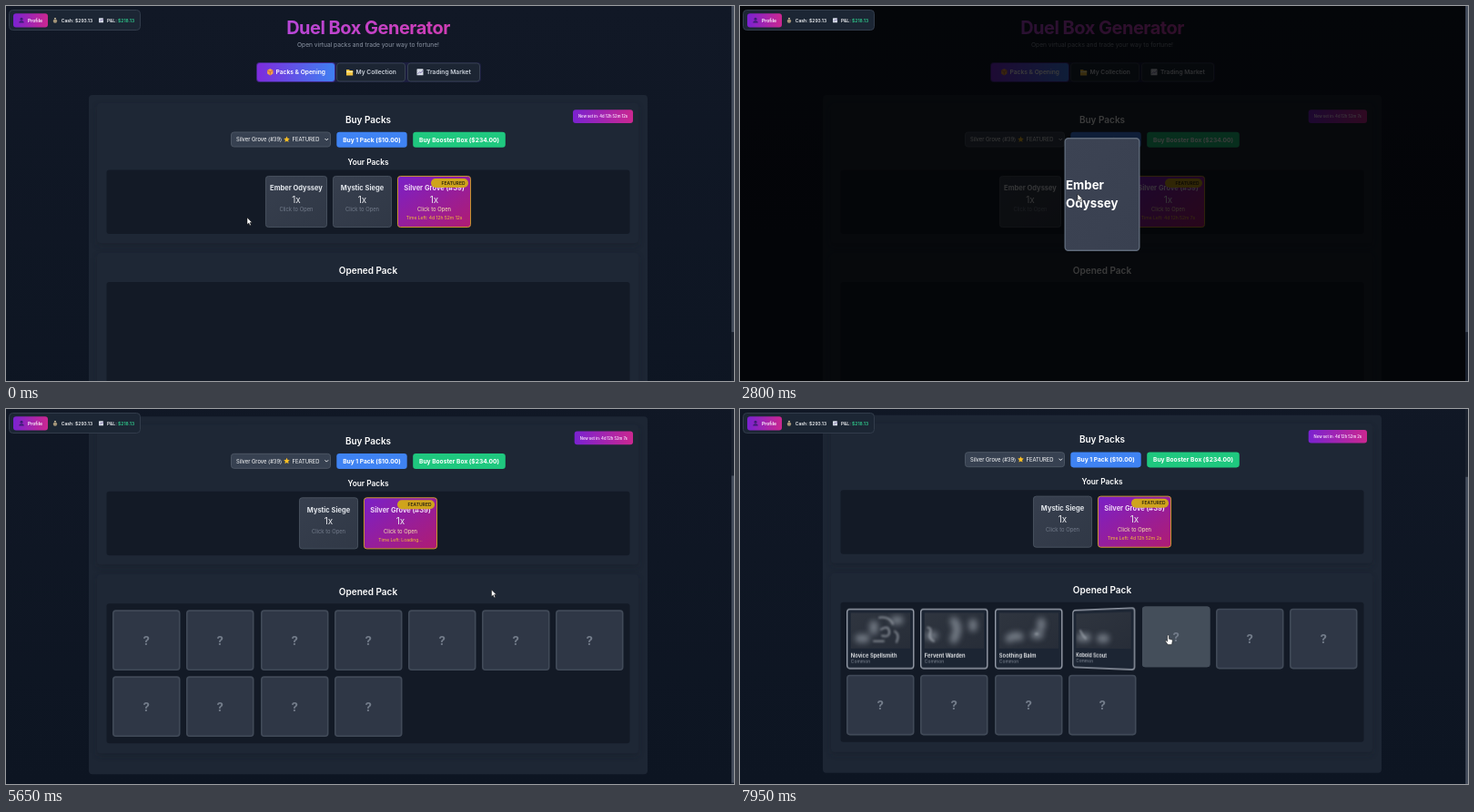
Animation, 800 px wide and 413 px high, one loop 8000 ms. Source, as an HTML page:

```html
<!DOCTYPE html>
<html lang="en">
<head>
<meta charset="utf-8">
<title>Pack opening</title>
<style>
html, body { margin: 0; width: 100%; height: 100%; overflow: hidden; background: #101724; }
#stage { position: relative; width: 800px; height: 413px; overflow: hidden; }
#page { position: absolute; left: 0; top: 0; width: 800px; height: 505px; }
svg { position: absolute; left: 0; top: 0; display: block; overflow: visible; }
text { font-family: Inter, sans-serif; white-space: pre; }
.card { position: absolute; width: 74.5px; height: 66.7px; }
</style>
</head>
<body>
<div id="stage">
  <div id="page"></div>
  <svg id="top" width="800" height="413"></svg>
</div>
<script>
const LOOP = 8000;
const $ = id => document.getElementById(id);

// ---- markup helpers ----
const rect = (x, y, w, h, fill, more = '') =>
  `<rect x="${x}" y="${y}" width="${w}" height="${h}" fill="${fill}" ${more}/>`;
const box = (x, y, w, h, fill, line, r = 3, lw = 1) =>
  rect(x + lw / 2, y + lw / 2, w - lw, h - lw, fill, `rx="${r}" stroke="${line}" stroke-width="${lw}"`);
const text = (s, x, y, size, fill = '#fff', weight = 400, anchor = 'middle', more = '') =>
  `<text x="${x}" y="${y}" font-size="${size}" fill="${fill}" font-weight="${weight}" text-anchor="${anchor}" ${more}>${s}</text>`;
const grad = (id, a, b, x2 = 1, y2 = 0) =>
  `<linearGradient id="${id}" x2="${x2}" y2="${y2}"><stop stop-color="${a}"/><stop offset="1" stop-color="${b}"/></linearGradient>`;
const path = (d, fill, more = '') => `<path d="${d}" fill="${fill}" ${more}/>`;

const chartIcon = (x, y, s) =>
  rect(x, y, s, s, '#d5dbe6', 'rx=".6"') +
  path(`M${x + 1} ${y + s - 1.5}l${s * .3} ${-s * .3} ${s * .2} ${s * .15} ${s * .3} ${-s * .4}`, 'none', 'stroke="#7c6ea8" stroke-width=".9"');
const star = (x, y, r) => {
  const pts = [...Array(10)].map((_, i) => {
    const a = i * Math.PI / 5 - Math.PI / 2, q = i % 2 ? r * .48 : r;
    return (x + q * Math.cos(a)).toFixed(2) + ',' + (y + q * Math.sin(a)).toFixed(2);
  });
  return `<polygon points="${pts.join(' ')}" fill="#fbbf24"/>`;
};

// ---- page ----
const defs = `<defs>
  ${grad('bg', '#111826', '#0d1522', 0, 1)}
  ${grad('title', '#b847d8', '#d03db4')}
  ${grad('tab', '#7e2bdc', '#3f80f2')}
  ${grad('pink', '#7a22d0', '#cb2790')}
  ${grad('foil', '#7a20c8', '#b01c72', 1, 1)}
  ${grad('slate', '#373f4e', '#303846', 1, 1)}
  ${grad('wrap', '#3c4353', '#394050', 1, 1)}
  ${grad('art', '#2f353f', '#272d38', 1, 1)}
  <filter id="soft" x="-10%" y="-20%" width="120%" height="140%"><feGaussianBlur stdDeviation="3"/></filter>
  <filter id="haze" x="-10" y="-10" width="95" height="70" filterUnits="userSpaceOnUse"><feGaussianBlur stdDeviation=".9"/></filter>
  <filter id="fog" x="-10" y="-10" width="95" height="70" filterUnits="userSpaceOnUse"><feGaussianBlur stdDeviation="3.2"/></filter>
</defs>`;

const header =
  text('Duel Box Generator', 398, 31, 20, 'url(#title)', 700, 'middle', 'letter-spacing="-.5"') +
  text('Open virtual packs and trade your way to fortune!', 398, 44.8, 6.67, '#8b94a3') +
  rect(275, 62, 247, 22, '#6d4df0', 'rx="4" opacity=".12"') +
  rect(275, 62, 87, 22, '#7c3aed', 'rx="4" opacity=".4"') +
  rect(276, 63, 85, 20, 'url(#tab)', 'rx="3"') +
  box(363, 62.5, 76, 21, '#1c2533', '#374151') +
  box(441, 62.5, 80, 21, '#1c2533', '#374151') +
  path('M290.3 69l3.2 1.8v3.8l-3.2 1.8-3.2-1.8v-3.8z', '#f59e4b') +
  path('M287.1 70.8l3.2 1.8 3.2-1.8M290.3 72.6v3.8', 'none', 'stroke="#a3542a" stroke-width=".6"') +
  path('M374 70h3l.8 1h3.4v5.5h-7.2z', '#f5c542') + rect(374, 72, 7.2, 1, '#fdf0c0') +
  chartIcon(451.5, 69.3, 7) +
  text('Packs &amp; Opening', 296.5, 75.4, 6.67, '#fff', 600, 'start') +
  text('My Collection', 384.5, 75.4, 6.67, '#cbd2dc', 600, 'start') +
  text('Trading Market', 462, 75.4, 6.67, '#cbd2dc', 600, 'start');

const section = (y, h, id) =>
  rect(100, y + 3, 595, h, '#131b28', `rx="4" filter="url(#soft)" opacity=".4" id="${id}Shade"`) +
  rect(100, y, 595, h, '#1e2735', `rx="4" id="${id}"`);

const shop =
  text('Buy Packs', 398, 128.7, 10, '#fff', 600) +
  `<rect id="badge" y="114.3" height="14.6" rx="3" fill="url(#pink)"/>` +
  text('', 656, 123.2, 4.17, '#f8e0fc', 600, 'middle', 'id="timer"') +
  box(247, 138.5, 110, 17, '#374151', '#4b5563') +
  text('Silver Grove (#39)', 253, 149.2, 5.83, '#fff', 400, 'start') + star(308.5, 147, 3.5) +
  text('FEATURED', 314.5, 149.2, 5.83, '#fff', 400, 'start') +
  path('M350.5 146l1.8 1.8 1.8-1.8', 'none', 'stroke="#fff" stroke-width=".9"') +
  rect(363.3, 138.7, 77.4, 17, '#3f83f3', 'rx="3.3"') + text('Buy 1 Pack ($10.00)', 402, 149.6, 6.67, '#fff', 700) +
  rect(447.2, 138.7, 101.6, 17, '#1fc87f', 'rx="3.3"') + text('Buy Booster Box ($234.00)', 498, 149.6, 6.67, '#fff', 700) +
  text('Your Packs', 398, 174.5, 8.33, '#fff', 600) +
  rect(110.5, 180.5, 575, 70.5, '#131a26', 'rx="3"');

function pack(name, x, w, hot) {
  const c = x + w / 2;
  return box(x, 187, w, 57, hot ? 'url(#foil)' : 'url(#slate)', hot ? '#d9a52a' : '#4b5563', 3, .9) +
    text(name, c, 203.4, 7.5, hot ? '#efd9f7' : '#e3e7ec', 700) +
    text('1x', c, 216.8, 10, '#e5e7eb') +
    text('Click to Open', c, 226.3, 5.83, hot ? '#f6e3ae' : '#727b8a') +
    (hot ? rect(x + 37, 190, 41, 10, '#cfa41c', 'rx="5"') +
      text('FEATURED', x + 61.5, 196.8, 5, '#2a2210', 600) +
      text('', c, 235.2, 5, '#f2c536', 400, 'middle', 'id="left"') : '');
}

$('page').innerHTML = `<svg width="800" height="505">${defs}
  ${rect(0, 0, 800, 505, 'url(#bg)')}${header}
  ${rect(91, 98, 614, 394, '#1d2634', 'rx="4" id="panel"')}
  ${section(107, 154, 'secA')}${section(272, 197, 'secB')}${shop}
  <g id="first">${pack('Ember Odyssey', 285, 68)}</g>
  <g id="rest">${pack('Mystic Siege', 359, 65)}${pack('Silver Grove (#39)', 430, 81, true)}</g>
  ${text('Opened Pack', 398, 294.5, 10, '#fff', 600)}
  ${rect(110.5, 304, 575, 154, '#131a26', 'rx="3" id="tray"')}
</svg>`;

// ---- cards ----
const W = 74.5, H = 66.7;
const finds = [
  { name: 'Novice Spellsmith', lines: 'M36 10q11-2 15 7M38 23q8-5 9 2t-8 5M30 36h11M53 25q6 4 2 12', mist: 'M14 33h7M53 13h5M30 18v6' },
  { name: 'Fervent Warden', lines: 'M8 21q5 0 3 6t4 9', mist: 'M37 14q7 7 0 20M58 16v5M10 30h5' },
  { name: 'Soothing Balm', lines: 'M45 28h2', mist: 'M51 15v5M44 29h5M16 33q6-4 11-2' },
  { name: 'Kobold Scout', lines: 'M10 24q3 6 7 9', mist: 'M10 32h9M35 33h6' }
];
const stroke = (d, width, filter, color, alpha) => path(d, 'none',
  `stroke="${color}" stroke-width="${width}" stroke-linecap="round" filter="url(#${filter})" opacity="${alpha}"`);
const face = f => box(0, 0, W, H, '#1c2533', '#959ca8', 3, 1.4) +
  `<svg x="4.5" y="4.5" width="65.5" height="39.5" viewBox="4.5 4.5 65.5 39.5" style="overflow:hidden">
    ${rect(4.5, 4.5, 65.5, 39.5, 'url(#art)')}
    ${stroke(f.mist, 9, 'fog', '#98a0aa', .65)}${stroke(f.lines, 2, 'haze', '#b4bac2', .65)}
  </svg>` +
  text(f.name, 4.8, 53.8, 5.83, '#f1f3f5', 600, 'start') + text('Common', 4.8, 60.2, 5, '#858d9a', 400, 'start');

const cards = [...Array(11)].map((_, i) => {
  const el = document.createElement('div');
  const x = 117.3 + 81.15 * (i % 7), y = i < 7 ? 311 : 384.4;
  el.className = 'card';
  el.style.cssText = `left:${x}px;top:${y}px`;
  el.innerHTML = `<svg width="${W}" height="${H}"><g class="back">${box(0, 0, W, H, '#2f3746', '#414a58', 3, 1.6)}
    ${rect(0, 0, W, H, '#444e5a', 'rx="3" class="glow"')}
    ${text('?', W / 2, 38.2, 13.3, '#737c8a', 700)}</g><g class="front">${finds[i] ? face(finds[i]) : ''}</g></svg>`;
  $('page').append(el);
  const q = c => el.querySelector(c);
  return { el, x, y, back: q('.back'), front: q('.front'), glow: q('.glow'), click: [6500, 6900, 7250, 7600][i] };
});

// ---- fixed layer ----
$('top').innerHTML = rect(0, 0, 800, 413, '#000', 'id="dim"') +
  `<g id="wrapper">${box(356.5, 145, 83, 125, 'url(#wrap)', '#5f6a7a', 3.5, 1.4)}
    <g id="sealed">${text('Ember', 358, 202, 13.33, '#fff', 700, 'start')}${text('Odyssey', 358, 222, 13.33, '#fff', 700, 'start')}</g>
    ${text('OPENED', 398, 212, 13.33, '#fff', 700, 'middle', 'id="opened"')}
    <g id="strip">${box(358, 145.5, 78, 11.5, '#3e4656', '#5f6a7a', 1.5)}</g></g>` +
  rect(797, 0, 3, 413, '#1a212e') + rect(797.3, 0, 2.7, 10, '#454e5d', 'id="thumb"') +
  box(3, 4, 145, 23, '#1c2634', '#323c4b', 4) +
  rect(8, 8.3, 38, 15.2, 'url(#pink)', 'rx="3"') +
  `<circle cx="17" cy="14.3" r="1.5" fill="#3b1d75"/>` + path('M14.3 18.6q0-2.4 2.7-2.4t2.7 2.4z', '#3b1d75') +
  text('Profile', 24, 17.7, 5.1, '#fff', 600, 'start') +
  `<circle cx="54" cy="16.6" r="2.2" fill="#a39478"/>` + path('M52.8 12.9h2.4l-.6 1.7h-1.2z', '#c4b79a') +
  text('Cash: $293.13', 60.8, 17.7, 5, '#eef0f3', 600, 'start') +
  chartIcon(102, 13.3, 5) +
  text('P&amp;L: <tspan fill="#2fc98c">$218.13</tspan>', 111, 17.7, 5, '#eef0f3', 600, 'start') +
  `<g id="cursor">${path('M0 0v7.6l1.8-1.6 1.2 2.8 1.3-.6-1.2-2.7h2.3z', '#fff', 'id="arrow" stroke="#111" stroke-width=".5"')}
    ${path('M-.9.8q.9-1.4 1.8 0v3.4l3 .8q.9.3.8 1.2l-.6 3.2-.6 1.2h-3.9l-2.6-3.6q-.3-1.2.9-.9l1.2 1z', '#fff', 'id="hand" stroke="#111" stroke-width=".5"')}</g>`;

// ---- motion ----
const clamp = v => Math.max(0, Math.min(1, v));
const span = (t, a, b) => clamp((t - a) / (b - a));
const smooth = p => p * p * (3 - 2 * p);
function ease(p) { // cubic-bezier(.25,.1,.25,1)
  let lo = 0, hi = 1, u = p;
  for (let i = 0; i < 16; i++) {
    const v = 1 - u, x = .75 * v * v * u + .75 * v * u * u + u * u * u;
    if (x < p) lo = u; else hi = u;
    u = (lo + hi) / 2;
  }
  const v = 1 - u;
  return .3 * v * v * u + 3 * v * u * u + u * u * u;
}

// time, x, y of the pointer tip
const track = [
  [0, 265, 233], [100, 265, 233], [750, 320, 209], [2000, 320, 209], [2700, 371, 207], [2900, 371, 207],
  [3800, 445, 205], [4350, 445, 205], [4800, 520, 198], [5600, 533.5, 199], [5720, 533.5, 199],
  [6280, 177, 261.5], [6500, 177, 261.5], [7950, 470.5, 249], [8000, 476, 249]
];
function pointer(t) {
  let i = 1;
  while (i < track.length - 1 && t > track[i][0]) i++;
  const [a, x, y] = track[i - 1], [b, X, Y] = track[i];
  const p = span(t, a, b), k = a >= 6500 ? p : smooth(p);
  return [x + (X - x) * k, y + (Y - y) * k];
}
const scrollAt = t => 91.3 * smooth(span(t, 5080, 5700));
const inside = (t, x, y, w, h) => {
  const [px, py] = pointer(t), q = py + scrollAt(t);
  return px >= x && px <= x + w && q >= y && q <= y + h;
};
// hover transition: share of the last 120 ms spent over the box
function hover(t, ...area) {
  let n = 0;
  for (let i = 0; i < 8; i++) n += inside(t - i * 15, ...area);
  return ease(n / 8);
}
const set = (id, o) => { for (const k in o) $(id).setAttribute(k, o[k]); };
const show = (el, on) => { el.style.display = on ? '' : 'none'; };

function draw(t) {
  const dealt = t >= 4350, scroll = scrollAt(t), height = dealt ? 504.3 : 475;
  $('page').style.transform = `translateY(${-scroll}px)`;
  set('thumb', { y: scroll * 413 / height, height: 413 * 413 / height });
  const grow = dealt ? 0 : -29;
  set('panel', { height: 394 + grow });
  set('secB', { height: 197 + grow });
  set('secBShade', { height: 197 + grow });
  set('tray', { height: 154 + grow });

  const secs = t < 2000 ? 12 : t < 7000 ? 7 : 2;
  const clock = `4d 12h 52m ${secs}s`, w = secs > 9 ? 66 : 64.3;
  set('badge', { x: 689 - w, width: w });
  set('timer', { x: 689 - w / 2 });
  $('timer').textContent = 'New set in: ' + clock;
  $('left').textContent = 'Time Left: ' + (dealt && t < 7000 ? 'Loading...' : clock);

  show($('first'), !dealt);
  const overPack = t < 900 ? hover(t, 285, 187, 68, 57) : 0;
  set('first', { transform: `translate(0 ${-2 * overPack})` });
  set('rest', { transform: `translate(${dealt ? -37 : 0} 0)` });

  // opening overlay
  const veil = ease(span(t, 900, 1200)) * (1 - ease(span(t, 4350, 4600)));
  set('dim', { opacity: .77 * veil });
  const pop = .8 + .2 * ease(span(t, 900, 1250));
  set('wrapper', { opacity: veil, transform: `translate(398 207.5) scale(${pop}) translate(-398 -207.5)` });
  const pull = t > 2900 ? pointer(Math.min(t, 3800))[0] - 371 : 0;
  show($('strip'), pull > 0);
  set('strip', { transform: `translate(${pull} 0)`, opacity: .85 });
  show($('sealed'), t < 3800);
  show($('opened'), t >= 3800);

  cards.forEach((c, i) => {
    const come = ease(span(t, 4350 + i * 75, 4850 + i * 75));
    const h = t > 5700 ? hover(t, c.x, c.y, W, H) : 0;
    const turn = c.click ? 180 * ease(span(t, c.click, c.click + 600)) : 0, open = turn > 90;
    show(c.el, come > 0);
    c.el.style.opacity = come;
    c.el.style.transform = `translateY(${8.3 * (1 - come) - 2.1 * h}px)` +
      (turn > 0 && turn < 180 ? ` perspective(330px) rotateY(${open ? turn - 180 : turn}deg)` : '');
    show(c.back, !open);
    show(c.front, open);
    c.glow.setAttribute('opacity', h);
  });

  const [x, y] = pointer(t);
  const hand = t < 900 ? inside(t, 285, 187, 68, 57) : t > 5700 && cards.some(c => inside(t, c.x - 4, c.y, 82, H));
  set('cursor', { transform: `translate(${x} ${y})` });
  show($('hand'), hand);
  show($('arrow'), !hand);
}

const start = performance.now();
function tick() {
  draw((performance.now() - start) % LOOP);
  requestAnimationFrame(tick);
}
tick();
</script>
</body>
</html>
```
